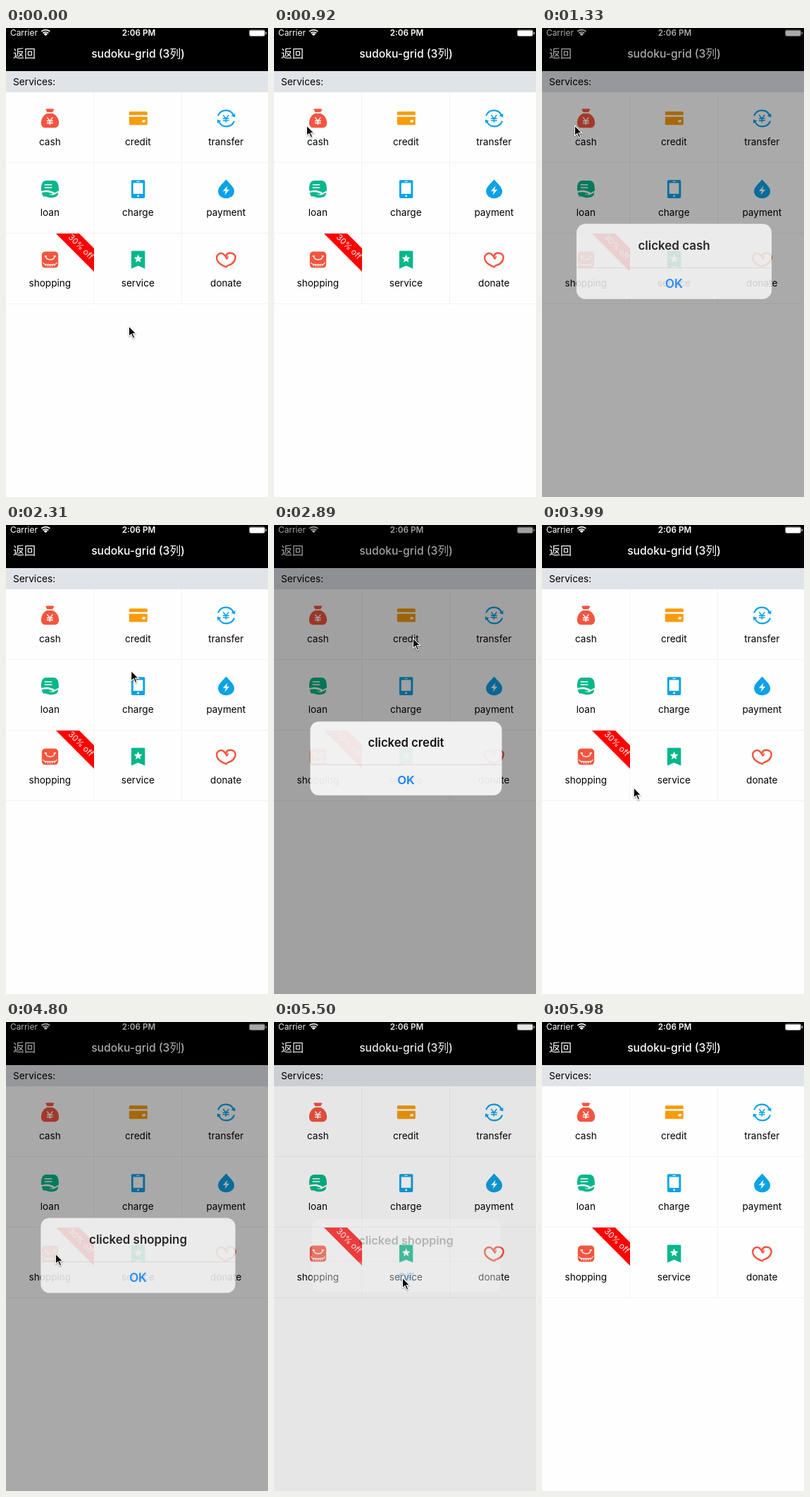
These frames come from a looping animation (372 by 664 pixels, 6420 ms). An HTML page with a canvas:

```html
<!DOCTYPE html>
<html lang="en">
<head>
<meta charset="utf-8">
<title>sudoku-grid</title>
<style>
  html, body { margin: 0; width: 100%; height: 100%; overflow: hidden; background: #fff; }
  canvas { display: block; width: 372px; height: 664px; }
</style>
</head>
<body>
<canvas id="stage"></canvas>
<script>
const W = 372, H = 664, LOOP = 6420;
const RED = '#f4553f', ORANGE = '#f89c0c', BLUE = '#0ba2e6', GREEN = '#06b78a';
const FONT = 'Inter, "Noto Sans CJK SC", "Noto Sans CJK", sans-serif';
const canvas = document.getElementById('stage');
const dpr = window.devicePixelRatio || 1;
canvas.width = W * dpr;
canvas.height = H * dpr;
const c = canvas.getContext('2d');

function text(str, x, y, size, { color = '#000', weight = 400, align = 'center' } = {}) {
  c.font = `${weight} ${size}px ${FONT}`;
  c.textAlign = align;
  c.fillStyle = color;
  c.fillText(str, x, y);
}

function rect(x, y, w, h, color) {
  c.fillStyle = color;
  c.fillRect(x, y, w, h);
}

function round(x, y, w, h, r, color) {
  c.beginPath();
  c.roundRect(x, y, w, h, r);
  c.fillStyle = color;
  c.fill();
}

function fill(d, color) {
  c.fillStyle = color;
  c.fill(new Path2D(d));
}

function line(d, color, width, cap = 'round') {
  c.strokeStyle = color;
  c.lineWidth = width;
  c.lineCap = cap;
  c.lineJoin = 'round';
  c.stroke(new Path2D(d));
}

function yen(y, color) {
  line(`M-4 ${y - 5} L0 ${y} L4 ${y - 5} M0 ${y} V${y + 5.5} M-4.4 ${y} H4.4 M-4.4 ${y + 2.8} H4.4`, color, 1.5, 'butt');
}

// Icons are drawn around the origin.
const icons = {
  cash() {
    fill('M-6.2 -13 Q-3 -14.3 0 -13.4 Q3 -14.3 6.2 -13 L3.8 -8.8 H-3.8 Z', RED);
    fill('M-4 -7 H4 C9.5 -5 12.8 1 12.8 6.5 C12.8 11.4 9.6 13.3 6 13.3 H-6 C-9.6 13.3 -12.4 11.4 -12.4 6.5 C-12.4 1 -9.5 -5 -4 -7 Z', RED);
    yen(3.6, '#fff');
  },
  credit() {
    round(-12.5, -9.7, 26, 5, [1.5, 1.5, 0, 0], ORANGE);
    round(-12.5, -2.3, 26, 11.6, [0, 0, 1.5, 1.5], ORANGE);
    fill('M6.5 2.2 H11 L10 5.6 H5.8 Z', '#fff');
  },
  transfer() {
    line('M-11.2 -3.6 A11.8 11.8 0 0 1 10.6 -4.6', BLUE, 2.1, 'butt');
    line('M11.8 3.6 A11.8 11.8 0 0 1 -10 4.6', BLUE, 2.1, 'butt');
    fill('M13 -7 V-1.4 L7.4 -3.4 Z M-12.4 7 V1.4 L-6.8 3.4 Z', BLUE);
    yen(.2, BLUE);
  },
  loan() {
    fill('M-5 -12 H5 C10 -12 12.6 -8 12.6 0 V2.4 L6.4 5.6 Q5.6 3.4 2.6 3.2 Q-2 1.6 -5 1.8 L-12.2 2.8 C-13 -7 -10.5 -12 -5 -12 Z', GREEN);
    line('M-7.6 -6 H3 M-7.6 -2 H3', '#fff', 1.7, 'butt');
    fill('M-11.6 5 Q-4 3.4 1 5.4 Q4.4 6 3.6 7.6 H-2 Q2 9.4 6 8 L11.8 5 Q12 9 8.4 11 Q5 12.4 0 12.2 Q-3 11.6 -6 10.4 H-9.4 Q-11 8 -11.6 5 Z', GREEN);
  },
  charge() {
    round(-9.4, -12.7, 19.4, 25.6, 1.8, BLUE);
    rect(-6.6, -8.6, 13.7, 15.4, '#fff');
    line('M-1.5 -10.6 H2', '#fff', 1);
    c.beginPath();
    c.arc(.3, 9.8, 1.4, 0, 7);
    c.fillStyle = '#fff';
    c.fill();
  },
  payment() {
    fill('M.3 -13.6 C4 -9 11.8 -3 11.8 3 C11.8 9 6.5 13.3 .3 13.3 C-6 13.3 -11.2 9 -11.2 3 C-11.2 -3 -3.5 -9 .3 -13.6 Z', BLUE);
    fill('M2.2 -4.6 L-4.3 3 H-.3 L-1.8 8.4 L4.9 .8 H.9 Z', '#fff');
  },
  shopping() {
    round(-11.5, -11.4, 23.4, 23, 5, RED);
    line('M-6 -5 C-5 1.6 6 1.6 7 -5', '#fff', 1.5);
    line('M-7.2 -5 H-4.8 M5.8 -5 H8.2', '#fff', 1.3);
    line('M-9.6 4.4 Q-8.8 6.4 -7 6.6 Q0 7.4 7.4 6.6 Q9.2 6.4 10 4.4', '#fff', 1.2);
    line('M-6 7 V8.6 M-2.8 7.2 V9 M.2 7.2 V9.2 M3.2 7.2 V9 M6.4 7 V8.6', '#fff', 1.3);
  },
  service() {
    fill('M-9.4 -11.4 Q-9.4 -12.6 -8.2 -12.6 H8.8 Q10 -12.6 10 -11.4 V12.8 L.3 8.4 L-9.4 12.8 Z', GREEN);
    c.beginPath();
    for (let i = 0; i < 10; i++) {
      const r = i % 2 ? 2.8 : 6.2, a = i * Math.PI / 5 - Math.PI / 2;
      c.lineTo(.3 + r * Math.cos(a), -1.2 + r * Math.sin(a));
    }
    c.fillStyle = '#fff';
    c.fill();
  },
  donate() {
    line('M-1.6 -5.6 C-3.4 -9 -7.4 -10 -10.4 -8 C-14 -5.4 -13.8 -.6 -11.4 2.8 C-8.6 6.6 -4 8.8 .8 10.4', RED, 2.4);
    line('M1.4 -1.6 C-2 -4 .6 -9.2 6 -9.5 C11 -9.6 14.2 -6 13.2 -1.4 C11.8 4 7 7.4 1.8 8.6', RED, 2.5);
    line('M1.6 -1.6 C3 -2.6 3.2 -4 2.6 -5.2', RED, 1.2);
  }
};

function drawStatus() {
  rect(0, 0, W, 61, '#000');
  text('Carrier', 6, 11.3, 11.9, { color: '#fff', align: 'left' });
  text('2:06 PM', 188.5, 11.3, 11.7, { color: '#fff', weight: 600 });
  for (const r of [3.6, 6.8, 10]) {
    c.beginPath();
    c.arc(56.3, 11.6, r - 1, -2.3, -.84);
    c.strokeStyle = '#fff';
    c.lineWidth = r < 4 ? 3 : 1.8;
    c.lineCap = 'butt';
    c.stroke();
  }
  c.beginPath();
  c.roundRect(345.4, 2.9, 22.2, 8.6, 2);
  c.strokeStyle = '#aaa';
  c.lineWidth = .8;
  c.stroke();
  round(346, 3.4, 21, 7.6, 1.4, '#fff');
  round(368.6, 5.6, 1.4, 3.4, .7, '#ccc');
  text('返回', 10, 41.5, 16, { color: '#fff', align: 'left' });
  text('sudoku-grid (3列)', 187.5, 41.5, 15.7, { color: '#fff', weight: 500 });
}

function drawRibbon() {
  fill('M71 291 H104 L125 312 V345 Z', '#f00');
  c.save();
  c.beginPath();
  c.rect(0, 291, 125, 99);
  c.clip();
  c.translate(106.4, 309.6);
  c.rotate(Math.PI / 4);
  text('30% off', 0, 4.2, 11.7, { color: '#fff' });
  c.restore();
}

function drawPage() {
  rect(0, 0, W, H, '#fefefe');
  drawStatus();
  rect(0, 61, W, 30, '#e0e3e8');
  text('Services:', 10, 81, 13.7, { align: 'left' });
  for (const y of [190, 290, 390]) rect(0, y, W, 1, '#f2f2f2');
  for (const x of [124, 249]) rect(x, 91, 1, 300, '#f2f2f2');
  Object.keys(icons).forEach((name, i) => {
    const x = 62.3 + i % 3 * 125, y = 128 + Math.floor(i / 3) * 100;
    c.save();
    c.translate(x, y);
    icons[name]();
    c.restore();
    text(name, x, y + 38, 13.6);
  });
  drawRibbon();
}

// Critically damped spring from 0 to 1.
function spring(ms) {
  const k = Math.max(0, ms) * .0228;
  return 1 - (1 + k) * Math.exp(-k);
}

const alerts = [
  { label: 'cash', open: 1190, press: 1910 },
  { label: 'credit', open: 2705, press: 3470 },
  { label: 'shopping', open: 4655, press: 5320 }
];

function drawAlert({ label, open, press }, t) {
  const shown = spring(t - open), gone = spring(t - press - 60);
  const alpha = shown * (1 - gone);
  if (alpha < .004) return;
  rect(0, 0, W, H, `rgba(0,0,0,${.4 * alpha})`);
  const scale = 1.2 - .2 * shown;
  c.save();
  c.globalAlpha = alpha;
  c.translate(187.5, 330.5);
  c.scale(scale, scale);
  round(-134, -51.5, 268, 103, 12, '#f8f8f8');
  if (t >= press) round(-134, 9, 268, 42.5, [0, 0, 12, 12], '#e9e9ea');
  rect(-134, 8.2, 268, .7, '#cacace');
  text('clicked ' + label, 0, -16, 16.4, { weight: 600 });
  text('OK', 0, 36.3, 16.3, { color: '#007aff', weight: 600 });
  c.restore();
}

const ease = {
  both: u => u * u * (3 - 2 * u),
  in: u => u * u,
  out: u => u * (2 - u),
  lin: u => u
};

// time, x, y, easing on the way there
const path = [
  [0, 174, 422], [370, 174, 422, 'lin'], [790, 38, 134, 'both'], [920, 46, 138, 'both'],
  [1550, 46, 138, 'lin'], [1850, 180, 360, 'both'],
  [2120, 180, 360, 'lin'], [2310, 177, 207, 'in'], [2460, 197, 160, 'out'],
  [2990, 197, 160, 'lin'], [3280, 185, 366, 'both'],
  [3790, 185, 366, 'lin'], [3990, 130, 372, 'in'], [4100, 113, 352, 'lin'], [4330, 70, 328, 'out'],
  [4890, 70, 328, 'lin'], [5190, 182, 362, 'both'],
  [5560, 182, 362, 'lin'], [5920, 369, 659, 'both'], [5980, 369, 659, 'lin']
];

function drawCursor(t) {
  const i = path.findIndex(p => p[0] > t);
  if (i < 0) return;
  const [t0, x0, y0] = path[i - 1], [t1, x1, y1, kind] = path[i];
  const u = ease[kind]((t - t0) / (t1 - t0));
  c.save();
  c.translate(x0 + (x1 - x0) * u, y0 + (y1 - y0) * u);
  c.shadowColor = 'rgba(0,0,0,.4)';
  c.shadowBlur = 2 * dpr;
  c.shadowOffsetY = dpr;
  fill('M0 -1 V15.6 L3.7 12.2 L6.1 17.8 L9.2 16.5 L6.9 11 H11.8 Z', '#fff');
  c.shadowColor = 'transparent';
  fill('M1 1.4 V13.2 L4.1 10.4 L6.7 16.4 L8 15.8 L5.4 9.9 H9.4 Z', '#000');
  c.restore();
}

function frame(now) {
  const t = (now - start) % LOOP;
  c.setTransform(dpr, 0, 0, dpr, 0, 0);
  drawPage();
  alerts.forEach(a => drawAlert(a, t));
  drawCursor(t);
  requestAnimationFrame(() => frame(performance.now()));
}

const start = performance.now();
frame(start);
</script>
</body>
</html>
```
